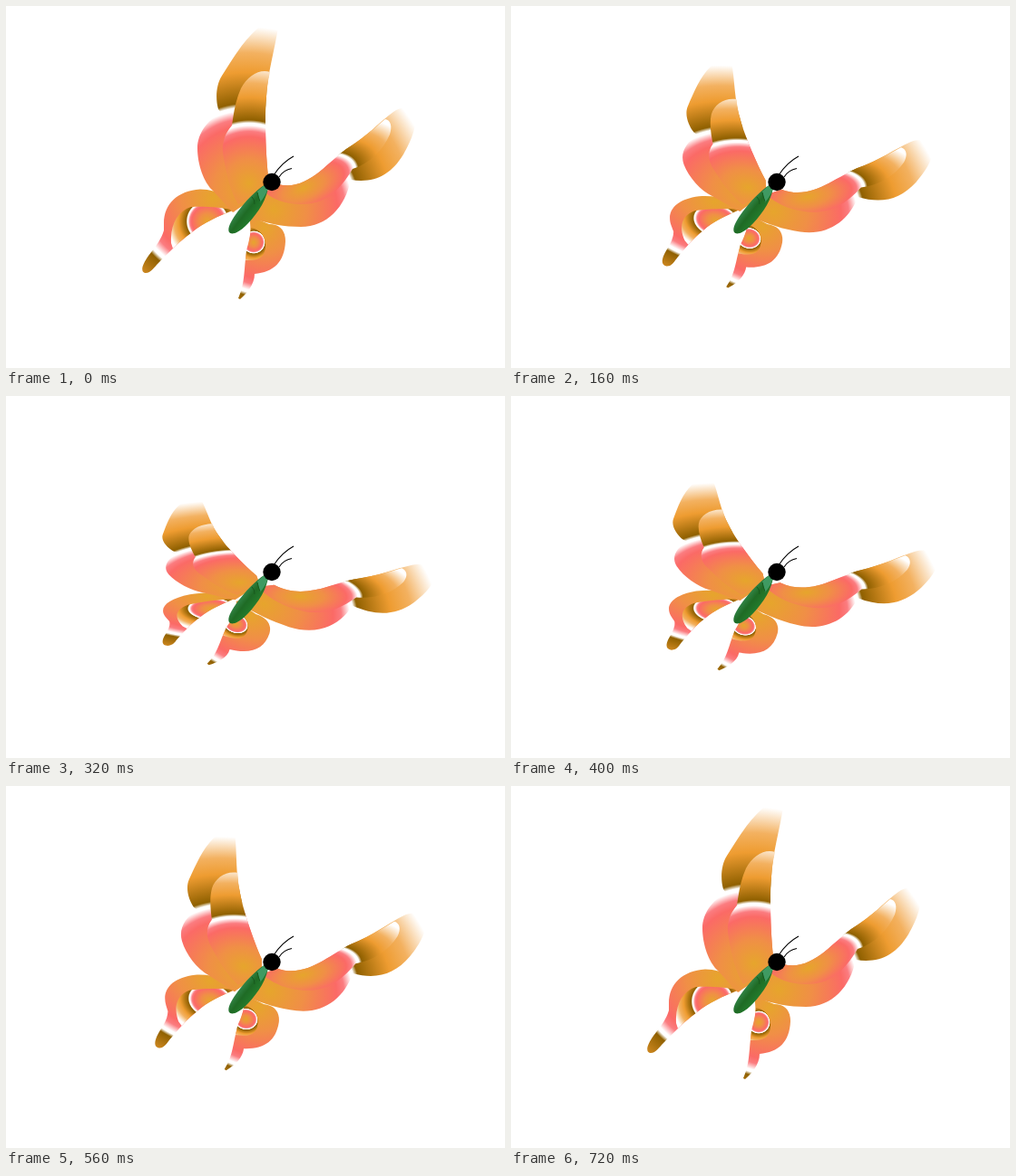
Write an HTML page that moves like this. It is 550 px wide and 400 px high and loops after 800 ms.

```html
<!DOCTYPE html>
<html lang="en">
<head>
<meta charset="utf-8">
<title>Butterfly</title>
<style>
  html, body { margin: 0; width: 100%; height: 100%; overflow: hidden; background: #fff; }
  svg { display: block; width: 550px; height: 400px; }
</style>
</head>
<body>
<svg viewBox="0 0 550 400">
  <defs>
    <radialGradient id="wing">
      <stop offset="0" stop-color="#e6a52c"/>
      <stop offset=".2" stop-color="#f08f46"/>
      <stop offset=".39" stop-color="#fb6a66"/>
      <stop offset=".435" stop-color="#fb7c80"/>
      <stop offset=".485" stop-color="#fff"/>
      <stop offset=".505" stop-color="#fff"/>
      <stop offset=".53" stop-color="#8f6000"/>
      <stop offset=".72" stop-color="#ee9c31"/>
      <stop offset=".84" stop-color="#f3b160"/>
      <stop offset="1" stop-color="#fff"/>
    </radialGradient>
    <linearGradient id="skin" gradientUnits="userSpaceOnUse" x1="258" y1="222" x2="272" y2="233">
      <stop offset="0" stop-color="#34864a"/>
      <stop offset=".5" stop-color="#1f6b25"/>
      <stop offset="1" stop-color="#237a2c"/>
    </linearGradient>
  </defs>
  <g id="left"></g>
  <g id="right"></g>
  <path fill="url(#skin)" d="M290 195C284 197 272 207 262 219C250 233 243 245 246 250C249 254 259 249 267 240C278 228 288 214 290 195Z"/>
  <path fill="#3f9a62" d="M290 195C285 197 280 202 277 205L280 217C286 210 289 203 290 195Z"/>
  <path fill="none" stroke="#175a1d" d="M271 211Q274 213 274 219M277 206Q278 211 280 216"/>
  <circle cx="293" cy="194.5" r="9.7"/>
  <path fill="none" stroke="#000" stroke-width="1.1" d="M295 187Q304 173 317 166M301 189Q306 181 315 179.5"/>
</svg>
<script>
const NS = 'http://www.w3.org/2000/svg';
const STEP = 80, FRAMES = 10, LOW = 4;
const $ = id => document.getElementById(id);

function add(parent, tag, attrs) {
  const el = document.createElementNS(NS, tag);
  for (const k in attrs) el.setAttribute(k, attrs[k]);
  return parent.appendChild(el);
}

// One wing cell: outline plus the centre, radius, tilt and squash of its colour rings.
function cell(side, cx, cy, r, d, tilt = 0, squash = 1) {
  const id = `${side}${$(side).children.length}`;
  add(document.querySelector('defs'), 'radialGradient', {
    id, href: '#wing', gradientUnits: 'userSpaceOnUse', cx: 0, cy: 0, r,
    gradientTransform: `translate(${cx} ${cy}) rotate(${tilt}) scale(1 ${squash})`
  });
  add($(side), 'path', { d, fill: `url(#${id})` });
}

cell('left', 228, 212, 172, `M252 228C247 212 236 203 214 202.5C189 204 174 219 174 240
  L174 248C171 259 163 268 157 276C150 286 148 293 153 295C159 296 163 289 168 284
  C180 272 190 261 205 250C218 239 235 232 250 226Z`);
cell('left', 222, 238, 44, `M249 225C235 222 215 221 204 222C188 227 181 243 182 262L184 268
  C191 261 198 255 205 250C218 239 235 232 249 226Z`);
cell('left', 265, 203, 180, `M300 23C291 19 283 19 277 25C262 38 250 58 238 77
  C231 88 231 104 234 114L237 118C222 126 211 141 211 157C211 175 218 195 228 204
  L250 228L285 205L289 188C286 160 285 120 287 100C288 75 297 45 300 23Z`);
cell('left', 268, 196, 132, `M291 73C280 69 266 77 259 91C253 104 251 118 249 132
  C240 142 237 155 240 168C243 185 247 205 256 219L285 205L289 188
  C286 160 285 120 287 100Q288 85 291 73Z`);

cell('right', 285, 245, 146, `M268 232L290 241C302 241 308 248 308 260C307 283 295 294 274 296
  C274 308 265 318 258 324L256 323C264 305 262 290 265 272C269 258 271 250 268 232Z`);
cell('right', 273, 261, 24, `M270 245C279 246 286 254 286 265C286 276 280 282 264 281
  L265 270Q269 257 270 245Z`);
cell('right', 295, 225, 181, `M285 206L300 197C332 205 354 173 375 158C398 144 412 128 427 117
  C435 111 444 111 449 117C456 126 447 149 438 164C424 187 406 196 380 192
  C374 222 354 244 325 244C306 244 292 241 268 234Z`);
cell('right', 328, 201, 123, `M285 206L300 197C332 205 354 173 375 158C394 146 406 135 418 125
  C424 126 426 133 423 142C415 160 401 174 382 180C366 207 350 219 325 219
  C308 219 296 214 285 206Z`, -25, .5);

// Full-stroke change of each wing: pivot, shift, and length/angle of both axes.
const wings = [
  { el: $('left'),  at: [255, 216], shift: [-2.7, 2.5], x: [.081, -9.6], y: [-.337, -41.7] },
  { el: $('right'), at: [285, 215], shift: [-9.3, 3.2], x: [.114, 17.6], y: [-.163, 14.9] }
];

function axis([grow, turn], p) {
  const len = 1 + grow * p, a = turn * p * Math.PI / 180;
  return [len * Math.cos(a), len * Math.sin(a)];
}

function pose(w, p) {
  const [a, b] = axis(w.x, p);
  const [d, s] = axis(w.y, p);
  const [px, py] = w.at;
  const e = px + w.shift[0] * p - a * px + s * py;
  const f = py + w.shift[1] * p - b * px - d * py;
  w.el.setAttribute('transform', `matrix(${a} ${b} ${-s} ${d} ${e} ${f})`);
}

function draw() {
  const n = Math.floor(performance.now() / STEP) % FRAMES;
  const p = n <= LOW ? n / LOW : (FRAMES - 1 - n) / (FRAMES - 1 - LOW);
  wings.forEach(w => pose(w, p));
  requestAnimationFrame(draw);
}
draw();
</script>
</body>
</html>
```
